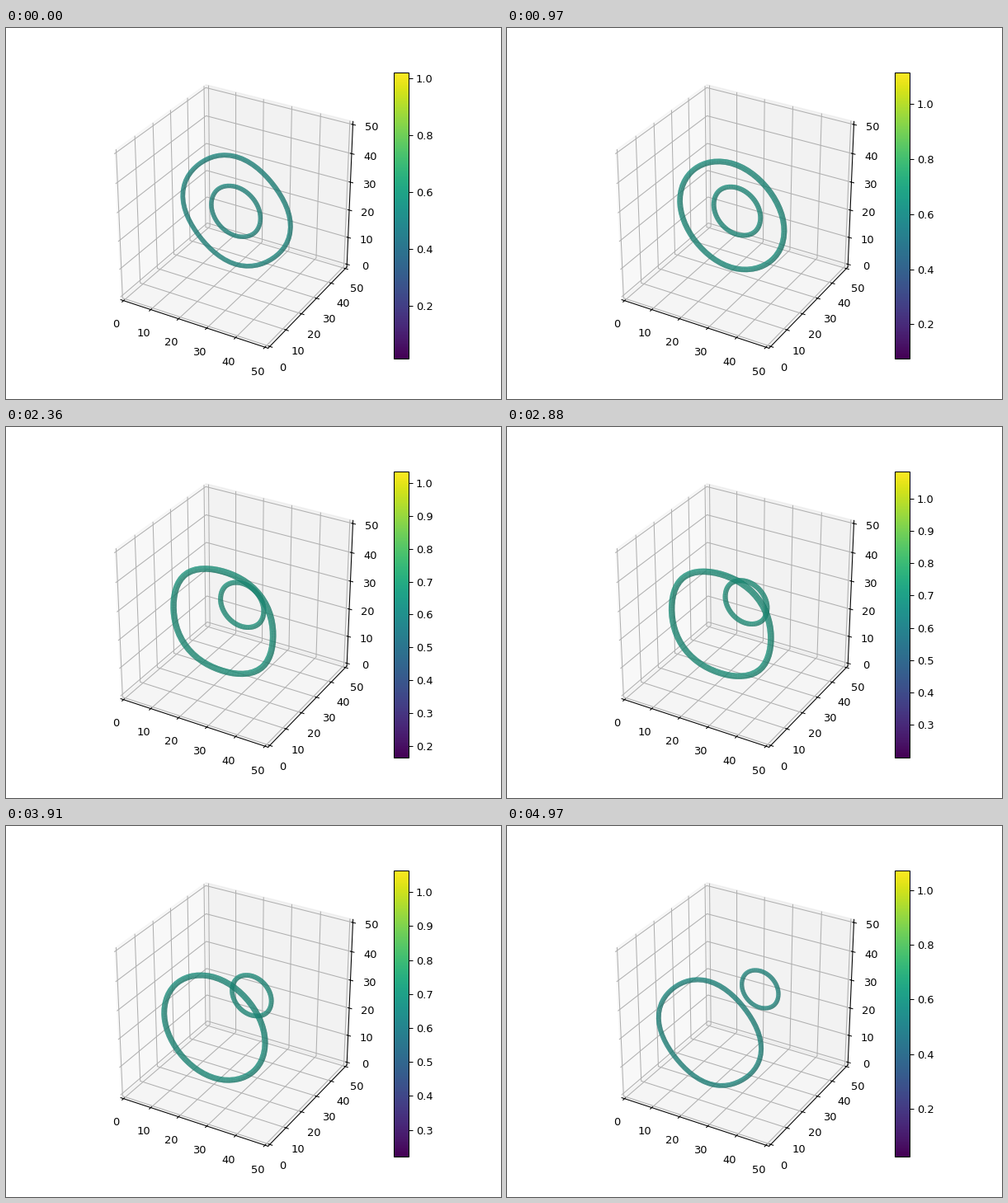
A matplotlib script that plays this animation: 600x450 px, repeating every 5000 ms.

```python
import numpy as np
import matplotlib.pyplot as plt
from matplotlib.animation import FuncAnimation
from matplotlib.cm import ScalarMappable
from mpl_toolkits.mplot3d.art3d import Poly3DCollection

FRAMES, LOOP_MS = 150, 5000
N_RING, N_TUBE = 60, 7
SIZE = 50
MID = SIZE / 2
LIGHT = np.array([-0.35, -0.55, 0.76])


def quads(grid):
    """Turn a grid of points into four-cornered faces."""
    a, b = grid[:-1, :-1], grid[1:, :-1]
    c, d = grid[1:, 1:], grid[:-1, 1:]
    return np.stack([a, b, c, d], axis=2).reshape(-1, 4, 3)


def ring(y, radius, tube, square=0.0):
    """Faces and brightness of a vortex ring lying in a plane of constant y."""
    theta = np.linspace(0, 2 * np.pi, N_RING + 1)[:, None]
    phi = np.linspace(0, 2 * np.pi, N_TUBE + 1)[None, :]
    normal = np.stack([np.cos(theta) * np.cos(phi),
                       np.sin(phi) + 0 * theta,
                       np.sin(theta) * np.cos(phi)], axis=-1)
    r = radius * (1 - square * np.cos(4 * theta)) + 0 * phi
    core = np.stack([MID + r * np.cos(theta),
                     y + 0 * r,
                     MID + r * np.sin(theta)], axis=-1)
    light = quads(normal).mean(axis=1) @ LIGHT
    return quads(core + tube * normal), 0.78 + 0.2 * light


def rings(t):
    swell = np.sin(np.pi * t)
    # The big ring drifts forward, wobbling between diamond and square
    big = ring(y=MID - 17.5 * t + t**2,
               radius=17.5 + 1.2 * (1 - t)**2,
               tube=0.75 + 0.22 * swell,
               square=-0.02 * np.cos(2 * np.pi * t))
    # The small ring waits, then drifts back while it shrinks
    small = ring(y=MID + 14.6 * max(0, (t - 0.17) / 0.83)**1.3,
                 radius=8.7 - 2.1 * t,
                 tube=0.7 + 0.1 * swell)
    faces = np.concatenate([big[0], small[0]])
    light = np.concatenate([big[1], small[1]])
    rgba = np.tile(plt.cm.viridis(0.52 + 0.05 * swell), (len(faces), 1))
    rgba[:, :3] *= light[:, None]
    rgba[:, 3] = 0.57
    return faces, rgba


def limits(t):
    """Colour range: the low end climbs and falls, the high end wobbles."""
    peak = 0.7
    if t < peak:
        low = 0.015 + 0.225 * t / peak
    else:
        low = 0.24 - 0.215 * ((t - peak) / (1 - peak))**2
    high = 1.07 - 0.05 * (1 - t / 2) * np.cos(2 * np.pi * t / 0.44)
    return low, high


fig = plt.figure(figsize=(6.4, 4.8), dpi=93.75)
ax = fig.add_subplot(projection="3d")
ax.set_box_aspect((1, 1, 1))

faces, rgba = rings(0)
mesh = Poly3DCollection(faces, facecolors=rgba, edgecolors="none", linewidths=0)
ax.add_collection3d(mesh)
for set_lim in (ax.set_xlim, ax.set_ylim, ax.set_zlim):
    set_lim(0, SIZE, view_margin=1 / 48)

scale = ScalarMappable(cmap="viridis")
scale.set_clim(*limits(0))
fig.colorbar(scale, ax=ax)


def update(i):
    t = i / (FRAMES - 1)
    faces, rgba = rings(t)
    mesh.set_verts(faces)
    mesh.set_facecolor(rgba)
    scale.set_clim(*limits(t))
    return [mesh]


anim = FuncAnimation(fig, update, frames=FRAMES, interval=LOOP_MS / FRAMES,
                     init_func=lambda: [mesh], repeat=True, repeat_delay=0,
                     blit=False)
plt.show()
```
